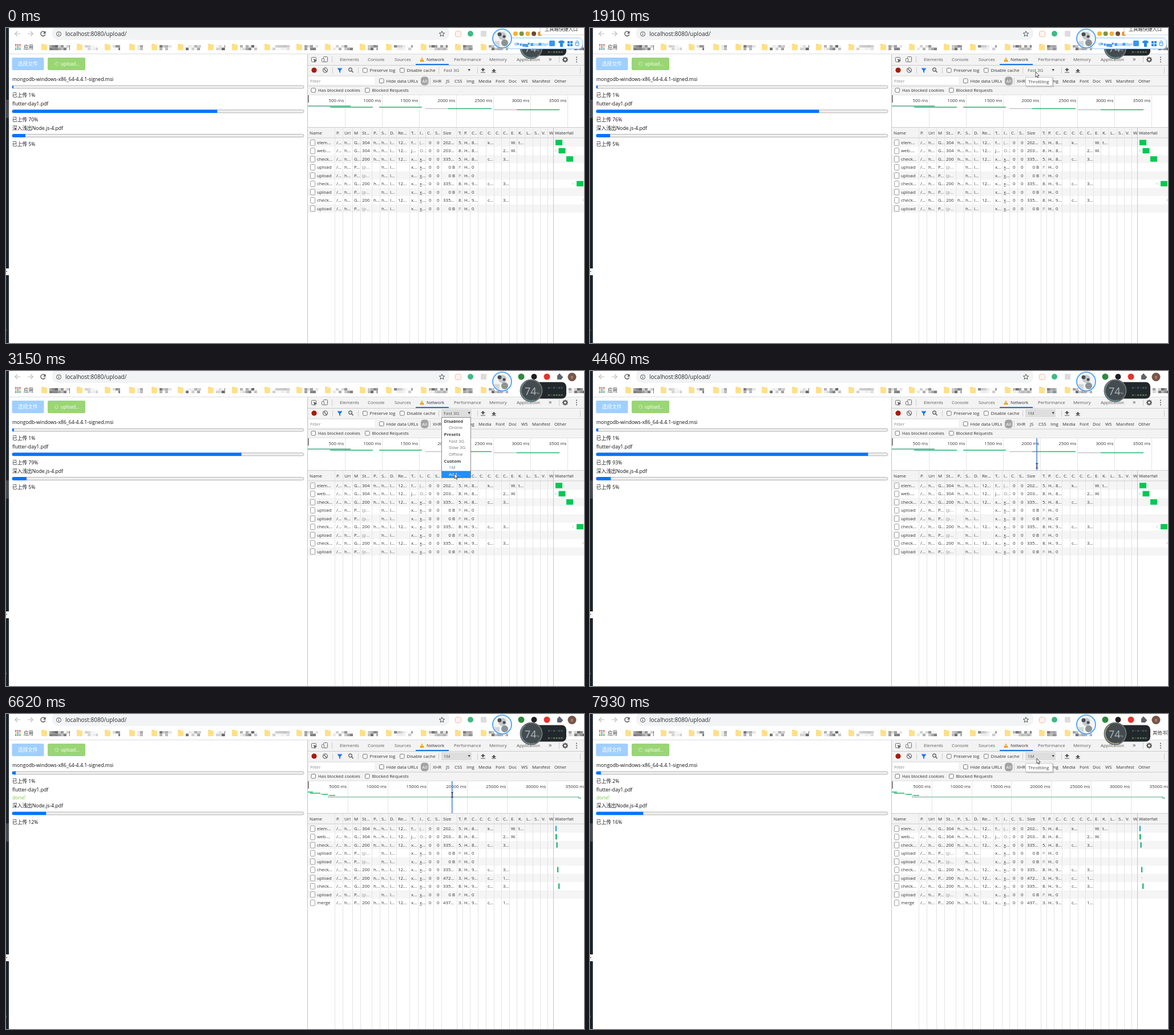
An HTML page with a canvas that plays this animation: 1013 px wide and 553 px high, repeating every 8000 ms.

```html
<!DOCTYPE html>
<html lang="zh">
<head>
<meta charset="utf-8">
<title>Upload</title>
<style>
html, body { margin: 0; width: 100%; height: 100%; overflow: hidden; background: #fff; }
canvas { display: block; }
</style>
</head>
<body>
<canvas id="stage" width="1013" height="553"></canvas>
<script>
const c = document.getElementById('stage').getContext('2d');
const LOOP = 8000;
const FONT = '"Open Sans", "Noto Sans CJK SC", "Noto Sans CJK JP", "Noto Sans", sans-serif';
const GREEN = '#00c853', BLUE = '#1a73e8';

// moments of hard changes, ms
const TOOLBAR_OFF = 2200, MENU_ON = 2400, MENU_OFF = 3700, FULL = 4800, DONE = 5650;

const BAR1 = [[0, .4], [840, .42], [3150, .55], [5320, .75], [6620, 1.2], [7930, 1.58]];
const BAR2 = [[0, 70.3], [840, 74.4], [1910, 76.4], [3150, 78.6], [3800, 80], [FULL, 100]];
const BAR3 = [[0, 4.5], [840, 4.6], [3150, 4.9], [4700, 5], [5320, 6.9], [6620, 11.6], [7930, 16.1]];
const PATH = [[150, 829, 556], [840, 830, 285], [1550, 781, 77], [2450, 781, 77], [2950, 786, 180],
  [3400, 786, 180], [3650, 783, 170], [4300, 783, 170], [4700, 784, 161], [5320, 784, 161],
  [6620, 782, 142], [6900, 782, 142], [7250, 783, 78]];

const COLS = [529, 576, 590, 607, 621, 641, 655, 670, 684, 707, 722, 735, 749, 763, 790, 800, 813,
  827, 841, 855, 868, 882, 895, 909, 923, 936, 949, 959];
const HEADS = 'Name|P.|Url|M|St...|P..|S..|D.|Re...|T..|I..|C.|S..|Size|T.|P.|C..|C.|C.|C.|C..|E.|K.|L..|S..|V.|W.|Waterfall'.split('|');

function at(keys, t, i = 1) {
  if (t <= keys[0][0]) return keys[0][i];
  for (let k = 1; k < keys.length; k++) {
    const a = keys[k - 1], b = keys[k];
    if (t <= b[0]) return a[i] + (b[i] - a[i]) * (t - a[0]) / (b[0] - a[0]);
  }
  return keys[keys.length - 1][i];
}
function noise(n) {
  const v = Math.sin(n * 127.1 + 11.7) * 43758.5453;
  return v - Math.floor(v);
}
function rect(x, y, w, h, fill) { c.fillStyle = fill; c.fillRect(x, y, w, h); }
function pill(x, y, w, h, r, fill, stroke) {
  c.beginPath();
  c.roundRect(x, y, w, h, r);
  if (fill) { c.fillStyle = fill; c.fill(); }
  if (stroke) { c.strokeStyle = stroke; c.lineWidth = 1; c.stroke(); }
}
function disc(x, y, r, fill, stroke, width = 1) {
  c.beginPath();
  c.arc(x, y, r, 0, Math.PI * 2);
  if (fill) { c.fillStyle = fill; c.fill(); }
  if (stroke) { c.strokeStyle = stroke; c.lineWidth = width; c.stroke(); }
}
function line(color, width, ...pts) {
  c.beginPath();
  for (let i = 0; i < pts.length; i += 2) c.lineTo(pts[i], pts[i + 1]);
  c.strokeStyle = color;
  c.lineWidth = width;
  c.stroke();
}
function poly(fill, ...pts) {
  c.beginPath();
  for (let i = 0; i < pts.length; i += 2) c.lineTo(pts[i], pts[i + 1]);
  c.closePath();
  c.fillStyle = fill;
  c.fill();
}
// y is the middle of the capitals
function text(s, x, y, color = '#333', size = 7.85, weight = 400, align = 'left') {
  c.font = `${weight} ${size}px ${FONT}`;
  c.textAlign = align;
  c.fillStyle = color;
  c.fillText(s, x, y + size * .35);
}
function check(x, y, label) {
  pill(x - 3.5, y - 3.5, 7.5, 7.5, 1.5, '#fff', '#777');
  if (label) text(label, x + 8.5, y + .3);
}
function mosaic(x, y, w, h, seed, dark) {
  for (let i = 0; i * 5 < w; i++) for (let j = 0; j * 4.5 < h; j++) {
    const v = Math.round(253 - dark * Math.pow(noise(seed + i * 7 + j * 3.3), 1.5));
    rect(x + i * 5, y + j * 4.5, Math.min(5, w - i * 5), 4.5, `rgb(${v},${v},${v})`);
  }
}

function browser(t) {
  rect(0, 0, 5, 553, '#1c242c');
  rect(0, t < TOOLBAR_OFF ? 126 : 192, 5, 32, '#454a50');
  rect(0, 422, 5, 12, '#f4f4f4');
  rect(0, 427, 2, 1, '#555');
  text('4', -3, 531, '#ddd', 7);

  pill(81, -3, 696, 24, 11, '#f1f3f4');
  line('#b8bbbe', 1.2, 25, 10, 16, 10, 20, 6);
  line('#b8bbbe', 1.2, 16, 10, 20, 14);
  line('#b8bbbe', 1.2, 38, 10, 47, 10, 43, 6);
  line('#b8bbbe', 1.2, 47, 10, 43, 14);
  c.beginPath();
  c.arc(65, 10, 4, .3, 5.4);
  c.strokeStyle = '#555';
  c.lineWidth = 1.4;
  c.stroke();
  poly('#555', 69.5, 5, 69.5, 10, 65, 9.6);
  disc(92.5, 10.5, 4, null, '#555');
  rect(92, 9.8, 1, 3, '#555');
  rect(92, 8, 1, 1, '#555');
  text('localhost:8080/upload/', 104, 10.5, '#2b2d30', 10);
  c.beginPath();
  for (let i = 0; i < 10; i++) {
    const r = i % 2 ? 2.2 : 5, a = i * Math.PI / 5 - Math.PI / 2;
    c.lineTo(764 + r * Math.cos(a), 10.5 + r * Math.sin(a));
  }
  c.closePath();
  c.strokeStyle = '#555';
  c.lineWidth = 1;
  c.stroke();

  ['#ea4335', '#fbbc05', '#34a853'].forEach((col, j) => {
    for (let i = 0; i < 3; i++) rect(16 + i * 3.6, 28.5 + j * 3.6, 2.4, 2.4, i === 1 ? '#4285f4' : col);
  });
  text('应用', 31, 33.5, '#333', 8.6);
  const marks = [62, 112, 124, 161, 173, 200, 216, 240, 255, 290, 301, 341, 354, 384, 396, 440, 453, 498,
    509, 547, 559, 608, 620, 652, 666, 713, 727, 774, 787, 818, 832, 880];
  for (let i = 0; i < marks.length; i += 2) {
    const x = marks[i], light = i === 2 || i === 16;
    pill(x, 28, 5, 4, 1, '#f5d063');
    pill(x, 29, 10, 10, 1, '#ffe08a');
    mosaic(x + 14, 30, marks[i + 1] - x - 14, 9, i * 13, light ? 70 : 150);
  }
  if (t < 7200) mosaic(986, 30, 27, 9, 91, 150);
  else text('其他书签', 986, 33.5, '#333', 8.4);
  rect(5, 45, 1008, 1, '#dadce0');
}

function extensions(t) {
  pill(787.5, 5.5, 10, 10, 3, '#fff4f0', '#f0b9a6');
  disc(814, 10, 5, '#41b883');
  pill(832, 5, 10, 10, 1, '#dcdcdc');
  disc(903, 10, 5.5, '#2e8b3d');
  disc(925.5, 10, 5, '#1d1f22');
  disc(948, 10, 5.5, '#e5332a');
  pill(966, 7, 8, 8, 1.5, '#5f6368');
  disc(970, 6.5, 2, '#5f6368');
  disc(974, 11, 2, '#5f6368');
  disc(992, 10.5, 7.5, '#795548');
  text('c', 992, 10, '#fff', 7.5, 400, 'center');

  // usage meter
  pill(925, 19.5, 57, 29, 8, '#22272c');
  for (let i = 0; i < 6; i++) {
    rect(950 + i * 4.5, 28, 3, 3, noise(i + 2) > .4 ? '#41555a' : '#2c353a');
    rect(950 + i * 4.5, 41, 3, 2.5, noise(i + 8) > .4 ? '#5d7a50' : '#39453c');
  }
  disc(920.5, 34.5, 19, '#454c50', '#6d7371', 2);
  c.beginPath();
  c.arc(920.5, 34.5, 17.5, 1.2, 4.1);
  c.strokeStyle = t > 6900 ? '#a9ad72' : '#5d8a94';
  c.lineWidth = 1.5;
  c.stroke();
  text('74', 909, 35.5, '#aebbc0', 18);
  text('%', 930, 39, '#9aa6ab', 6);

  if (t < TOOLBAR_OFF) {
    rect(888, 0, 125, 18, '#fff');
    ['#f3b52f', '#7d9640', '#f0b440', '#6b4a31', '#e59a36'].forEach((col, i) => disc(893 + i * 10.7, 10, 4, col));
    pill(936.5, -4, 80, 16, 2, '#fff', '#d5d5d5');
    text('工具箱快捷入口', 944, 2.5, '#333', 8.3);
    pill(878, 17.5, 132, 19, 6, '#fff', '#8bc4fa');
    for (let i = 0; i < 14; i++) {
      const s = 2.5 + 3 * noise(i + 4);
      rect(891 + i * 4.7, 25 + 4 * noise(i + 30), s, s, noise(i + 9) > .5 ? '#4f9cf3' : '#b5d7fb');
    }
    pill(952, 22, 10, 10, 2, '#3d96f5');
    poly('#2588f2', 968, 24, 971, 22, 976, 22, 979, 24, 978, 27, 976, 26, 976, 33, 971, 33, 971, 26, 969, 27);
    for (let i = 0; i < 4; i++) rect(984 + i % 2 * 5, 23 + (i >> 1) * 5, 4, 4, '#2588f2');
    disc(1001, 25, 2.3, null, '#2588f2');
    pill(998, 26, 6, 5, 1, '#fff', '#2588f2');
  }

  // round picture
  disc(869.5, 18.5, 16.5, '#f3f4f5', '#3f9df8', 1.7);
  c.save();
  c.beginPath();
  c.arc(869.5, 18.5, 15, 0, 7);
  c.clip();
  rect(855, 23, 10, 12, '#d3d7d9');
  disc(870, 14, 7, '#c3c8ca');
  disc(865, 11, 3.5, '#4a4e51');
  disc(873, 15, 2.5, '#4a4e51');
  disc(874, 26, 6, '#8d9295');
  c.restore();
}

function progress(y, pct) {
  const w = 511 * pct / 100;
  pill(11, y - 2.5, 511, 5, 2.5, '#efefef', '#b2b2b2');
  c.save();
  c.beginPath();
  c.roundRect(10.5, y - 3, 512, 6, 3);
  c.clip();
  rect(10.5, y - 3, w + .5, 6, '#0075ff');
  c.restore();
}
function page(t) {
  pill(10.5, 52, 56, 22, 2, '#a0cfff');
  text('选择文件', 21, 63, '#fff', 8.7);
  pill(73, 52, 66, 22, 2, '#9ad576');
  for (let i = 0; i < 8; i++) {
    const a = i * Math.PI / 4 + t / 2000 * Math.PI * 2, x = Math.cos(a), y = Math.sin(a);
    line(`rgba(255,255,255,${.5 + i / 16})`, 1, 88.5 + x * 2, 63 + y * 2, 88.5 + x * 3.8, 63 + y * 3.8);
  }
  text('upload...', 96, 63, '#fff', 8.1);

  const label = (s, y, color = '#111') => text(s, 11, y, color, 8.7);
  const loaded = p => '已上传 ' + Math.max(1, Math.round(p)) + '%';
  const p1 = at(BAR1, t), p2 = at(BAR2, t), p3 = at(BAR3, t);
  label('mongodb-windows-x86_64-4.4.1-signed.msi', 90);
  progress(103.5, p1);
  label(loaded(p1), 118);
  label('flutter-day1.pdf', 132.5);
  if (t < DONE) {
    progress(146.3, p2);
    if (t < FULL) label(loaded(p2), 161);
    else label('waiting...', 161, '#f0a020');
  } else label('done!', 147, '#85c250');
  const up = t < DONE ? 0 : 14.5;
  label('深入浅出Node.js-4.pdf', 175.5 - up);
  progress(189 - up, p3);
  label(loaded(p3), 204 - up);
}

function arrowIcon(x, y, dir) {
  poly('#555', x, y - 4 * dir, x + 4, y, x - 4, y);
  rect(x - 1.2, y - 2, 2.4, 4, '#555');
  rect(x - 4, y + 3.5, 8, 1, '#555');
}
function tools(t) {
  rect(528, 46, 485, 72, '#f3f3f3');
  [65, 83, 101.5, 117].forEach((y, i) => rect(529, y, 484, 1, i % 2 ? '#e0e0e0' : '#cccccc'));
  pill(535.5, 51.5, 8, 8, 1, null, '#6e6e6e');
  poly('#555', 539, 54, 545, 57, 542, 58, 541, 61);
  pill(556.5, 50.5, 7, 9, 1, null, '#6e6e6e');
  pill(553.5, 53.5, 4, 6, 1, '#f3f3f3', '#6e6e6e');
  rect(571, 50, 1, 11, '#ccc');
  const tabs = { Elements: 585, Console: 634, Sources: 681, Network: 737, Performance: 785, Memory: 847, Application: 895 };
  for (const name in tabs) text(name, tabs[name], 55.5, name === 'Network' ? '#333' : '#5a5a5a');
  poly('#f29900', 729, 51.5, 733, 59, 725, 59);
  rect(728.5, 54, 1, 3, '#fff');
  rect(718, 63, 58, 2, BLUE);
  text('»', 951, 54.5, '#555', 11);
  rect(969, 50, 1, 11, '#ccc');
  disc(980, 55.5, 3, null, '#555', 2);
  for (let i = 0; i < 8; i++) disc(980 + 4.2 * Math.cos(i * .785), 55.5 + 4.2 * Math.sin(i * .785), .9, '#555');
  [51.5, 55.5, 59.5].forEach(y => disc(1000, y, 1, '#555'));

  disc(540, 74, 4.6, '#a81b0c');
  disc(559.5, 74, 4, null, '#555', 1.1);
  line('#555', 1.1, 557, 71.5, 562, 76.5);
  [572, 617, 758, 826, 1006].forEach(x => rect(x, 69, 1, 11, '#ccc'));
  poly(BLUE, 580.5, 70.5, 589.5, 70.5, 586, 75, 586, 79, 584, 77.5, 584, 75);
  disc(603.5, 73, 2.8, null, '#555', 1.2);
  line('#555', 1.4, 605.5, 75, 608.5, 78);
  check(629, 74, 'Preserve log');
  check(694, 74, 'Disable cache');
  if (t > MENU_ON) rect(763, 67, 53, 14, '#dedede');
  text(t < MENU_OFF ? 'Fast 3G' : '1M', 767, 74.3, '#5a5a5a');
  poly('#555', 809.5, 72, 814, 72, 811.7, 76);
  arrowIcon(836, 74, 1);
  arrowIcon(855, 74, -1);

  rect(531, 86, 115, 13, '#fff');
  text('Filter', 533, 93, '#8a8a8a');
  check(658, 92.5, 'Hide data URLs');
  pill(727, 85.5, 13.5, 15, 5, '#a3a3a3');
  text('All', 733.7, 93, '#fff', 7.85, 400, 'center');
  rect(743, 87, 1, 12, '#ccc');
  const kinds = { XHR: 748, JS: 771, CSS: 786, Img: 807, Media: 828, Font: 858, Doc: 881, WS: 903, Manifest: 922, Other: 961 };
  for (const k in kinds) text(k, kinds[k], 93);
  check(538.5, 109, 'Has blocked cookies');
  check(633, 109, 'Blocked Requests');
}

function overview(t) {
  const late = t >= FULL;
  for (let i = 1; i <= 7; i++) {
    const x = late ? 529 + i * 69.8 : 528.6 + i * 65.05;
    rect(Math.round(x), 118, 1, 56, '#e4e4e4');
    text((late ? i * 5000 : i * 500) + ' ms', x - 1.5, 127, '#333', 7.85, 400, 'right');
  }
  rect(529, 118, 2, 13, '#8b8b8b');
  const seg = (x1, x2, y, col = '#21b56b', h = 1.5) => rect(x1, y - h / 2, x2 - x1, h, col);
  if (late) {
    seg(529, 538, 137); seg(533, 551, 139); seg(551, 554, 141, '#bbb');
    seg(554, 564, 141); seg(564, 567, 143, '#bbb'); seg(567, 577, 143);
    seg(564, 1004, 145.8, '#74b597', 1.2);
    rect(1003, 145, 1, 3, '#4fae86');
    if (t >= DONE) seg(1004, 1008, 147.5, '#4fae86');
  } else {
    seg(529, 604, 137, '#4aa789'); seg(568, 643, 139); seg(654, 729, 139);
    seg(735, 775, 141.5, '#c4c4c4'); seg(775, 851, 141.5);
    seg(855, 895, 143.5, '#c4c4c4'); seg(895, 970, 143.5);
  }
  rect(529, 174, 484, 1, '#ccc');
}

// name, method, status, type, initiator, size, time, length, then the sparse columns
const pending = name => [name, 'P...', '(p...', 'x...', 'x...', '0 B', 'P.', '0'];
const checked = (time, len) => ['check...', 'G...', '200', 'x...', 'x...', '335...', time, len, 'c...', '3...'];
const posted = (name, size) => [name, 'P...', '200', 'x...', 'x...', size, '3.', '9...', 'c...', '1...'];
function rowsAt(t) {
  const rows = [
    ['elem...', 'G...', '304', 'f...', '(...', '202...', '5.', '8...', 'k...', '', 'W.', 't...'],
    ['web....', 'G...', '304', 'j...', 'O...', '203...', '8.', '8...', '', '2...', 'W.'],
    checked('5.', '8...'), pending('upload'), pending('upload'), checked('8.', '9...'),
    t < FULL ? pending('upload') : posted('upload', '472...'),
    checked('8.', '9...'), pending('upload')];
  if (t >= FULL) rows.push(t < DONE ? pending('merge') : posted('merge', '437...'));
  return rows;
}
function table(t, hover) {
  rect(529, 175, 484, 18, '#f3f3f3');
  const rows = rowsAt(t), late = t >= FULL;
  const top = i => 194 + i * 14.45;
  rows.forEach((r, i) => {
    const y = top(i);
    if (hover >= y && hover < y + 14.45) rect(529, y, 484, 14.45, '#eef2fc');
    else if (i % 2 === 0) rect(529, y, 484, 14.45, '#f5f5f5');
  });
  COLS.slice(1).forEach((x, i) => rect(x, 175, 1, 378, i === 26 ? '#c4c4c4' : '#e3e3e3'));
  rect(529, 192.5, 484, 1, '#ccc');
  HEADS.forEach((h, i) => text(h, COLS[i] + 3, 184));

  rows.forEach((r, i) => {
    const y = top(i) + 7.3, wait = r[2][0] === '(';
    const put = (col, s, color) => s && text(s, COLS[col] + 3, y, color);
    pill(533.5, y - 5, 8, 10, 1, '#fff', '#9a9a9a');
    text(r[0], 545, y);
    put(1, '/...'); put(2, 'h...'); put(3, r[1]);
    put(4, r[2], wait ? '#8a8a8a' : '#333');
    if (!wait) { put(5, 'h...'); put(8, '12...'); }
    put(6, 'h...'); put(7, 'l...');
    put(9, r[3]);
    put(10, r[4], i < 2 ? '#777' : '#333');
    if (i > 1) rect(COLS[10] + 3, y + 4, 4, .8, '#555');
    text('0', 741, y);
    text('0', 755, y);
    if (wait) text('0 B', 787, y, '#333', 7.85, 400, 'right');
    else put(13, r[5]);
    put(14, r[6], wait ? '#8a8a8a' : '#333');
    put(15, 'H..'); put(16, r[7]);
    put(18, r[8]); put(20, r[9]); put(21, r[10]); put(22, r[11]);
  });

  const bar = (i, x, w, col = GREEN) => rect(x, top(i) + 2.3, w, 9.5, col);
  const dot = (i, x) => rect(x, top(i) + 5, 1, 4, '#c8c8c8');
  if (late) {
    bar(0, 963, 2, '#2f9fc0'); bar(1, 963, 2.5, '#1bb270'); bar(2, 964.5, 2.3, '#1bb270');
    bar(5, 966, 2.2, '#1bb270'); dot(6, 967); bar(7, 968, 2.3, '#1bb270');
  } else {
    bar(0, 963, 12); bar(1, 968.5, 12); bar(2, 982, 12); bar(5, 1000, 12);
    dot(1, 963); dot(5, 993); dot(7, 1011);
  }
}

function tooltip() {
  rect(764, 87, 49, 17, 'rgba(0,0,0,.13)');
  pill(763.5, 86.5, 47, 15, 0, '#fff', '#c4c4c4');
  text('Throttling', 768, 94, '#444', 8);
}
function menu(y) {
  rect(763, 81, 52, 107, '#fff');
  const hit = Math.floor((y + 4 - 82) / 11.68);
  ['Disabled', 'Online', 'Presets', 'Fast 3G', 'Slow 3G', 'Offline', 'Custom', '1M', 'Add...'].forEach((s, i) => {
    const bold = i === 0 || i === 2 || i === 6, on = i === hit && !bold;
    if (on) rect(763, 82 + i * 11.68, 52, 11.68, '#1e90ff');
    text(s, bold ? 767.5 : 776, 88 + i * 11.65, on ? '#fff' : bold ? '#444' : '#777', 7.85, bold ? 700 : 400);
  });
  c.strokeStyle = '#8a8a8a';
  c.lineWidth = 1;
  c.strokeRect(763.5, 81.5, 51, 106);
}
function pointer(t, x, y, open) {
  if (t < 150) return;
  if (!open && y > 117 && y < 174) {
    rect(x - 1, 118, 1.5, 56, '#3f7fe0');
    line('#222', 1, x - 2, y - 4, x + 2, y - 4);
    line('#222', 1, x, y - 4, x, y + 4);
    line('#222', 1, x - 2, y + 4, x + 2, y + 4);
  } else if (!open && y > 175 && COLS.some(s => Math.abs(s - x) < 4)) {
    rect(x - 2, y - 5, 1.2, 10, '#222');
    rect(x + .8, y - 5, 1.2, 10, '#222');
    line('#222', 1, x - 5, y, x + 5, y);
    poly('#222', x - 6, y, x - 3, y - 2.5, x - 3, y + 2.5);
    poly('#222', x + 6, y, x + 3, y - 2.5, x + 3, y + 2.5);
  } else {
    const shape = [0, 0, 0, 9, 2, 7.2, 3.4, 10.2, 4.8, 9.6, 3.5, 6.7, 6.2, 6.5].map((v, i) => v + (i % 2 ? y : x));
    poly('#fff', ...shape);
    line('#222', .8, ...shape, x, y);
  }
}

function draw() {
  const t = performance.now() % LOOP;
  const x = at(PATH, t), y = at(PATH, t, 2);
  const open = t >= MENU_ON && t < MENU_OFF;
  rect(0, 0, 1013, 553, '#fff');
  browser(t);
  page(t);
  tools(t);
  overview(t);
  table(t, t < 150 ? 0 : at(PATH, t - 90, 2));
  rect(528, 46, 1, 507, '#c4c4c4');
  extensions(t);
  if ((t > 1800 && t < MENU_ON) || t > 7600) tooltip();
  if (open) menu(y);
  pointer(t, x, y, open);
  requestAnimationFrame(draw);
}
draw();
</script>
</body>
</html>
```
